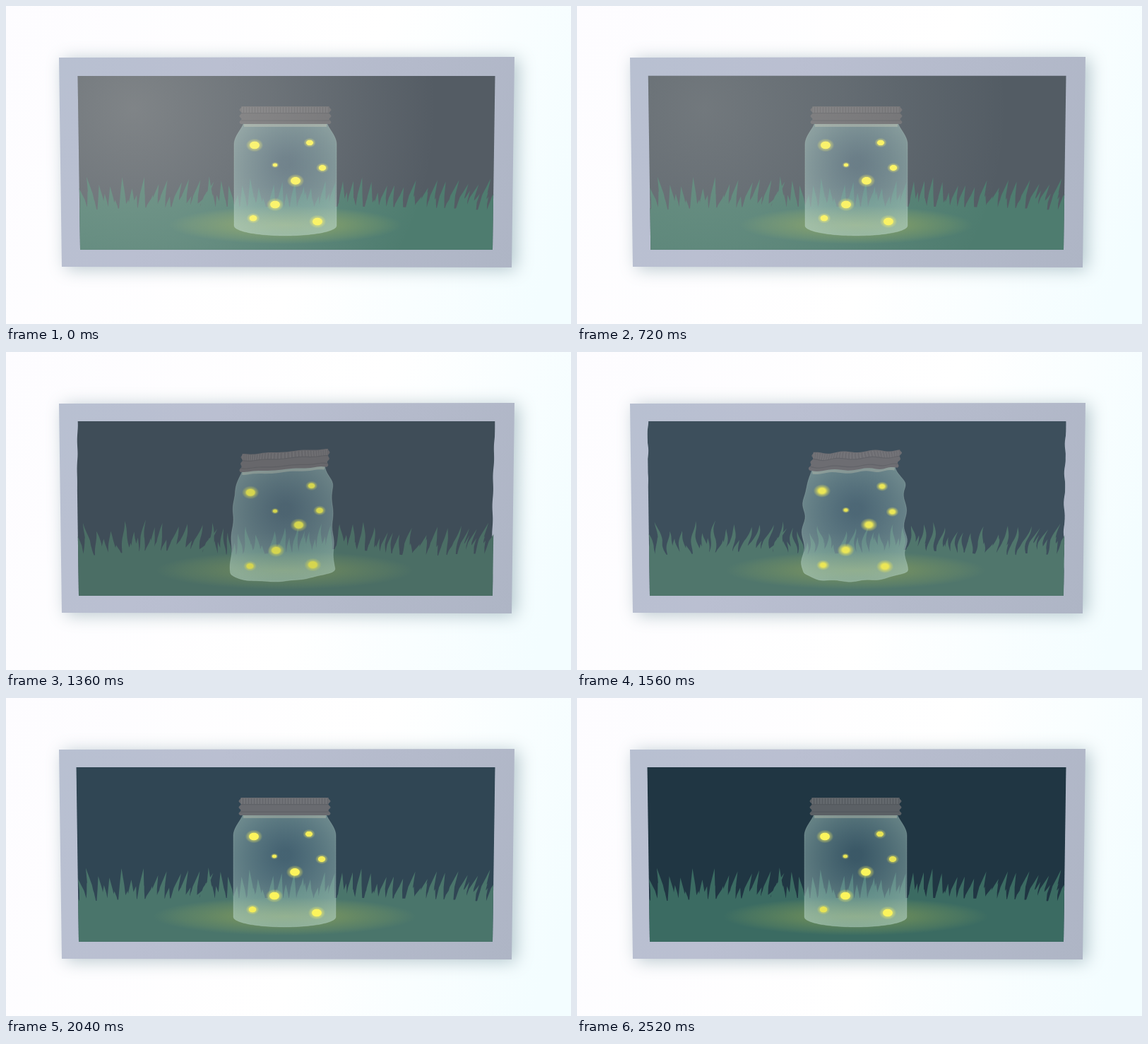
An HTML page with a canvas for the animation above (2.56 s loop, 800 by 450 pixels).

```html
<!DOCTYPE html>
<html>
<head>
<meta charset="utf-8">
<style>
html, body { margin: 0; width: 100%; height: 100%; overflow: hidden; }
canvas { display: block; }
</style>
</head>
<body>
<canvas id="stage" width="800" height="450"></canvas>
<script>
const ctx = document.getElementById('stage').getContext('2d');
const LOOP = 2560, CX = 395.5;
// Glass starts to clear, picture wobbles most, light returns, night
const PHASES = [700, 1360, 1720, 2520];

// x, y, radius
const FLIES = [[352, 197, 7], [430, 193.5, 5], [381, 225, 3.2], [448, 229, 5.2],
  [410, 247.3, 7], [381, 281, 7], [350, 300.3, 5.4], [441, 305, 7]];

const clamp = v => Math.max(0, Math.min(1, v));
const lerp = (a, b, f) => a + (b - a) * f;
const random = n => { const v = Math.sin(n * 127.1) * 43758.5; return v - Math.floor(v); };
const range = (from, to, step) =>
  Array.from({ length: Math.floor((to - from) / step) + 1 }, (_, i) => from + i * step);
const mirror = half => [...half, ...half.slice().reverse().map(([x, y]) => [-x, y])]
  .map(([x, y]) => [CX + x, y]);

const shoulder = y => 59 + 13.5 * Math.sin((y - 166) / 30 * Math.PI / 2) ** 1.3;
const JAR = mirror([
  ...range(166, 196, 3).map(y => [shoulder(y), y]),
  ...range(0, 1, 0.1).map(a => [72.5 * Math.cos(a * Math.PI / 2), 311 + 14 * Math.sin(a * Math.PI / 2)])]);
const LID = mirror(range(142, 167, 1).map(y => [63.5 + 1.5 * Math.cos((y - 147) * 0.72), y]));
const GROUND = [...range(90, 702, 12).map(x => [x, 284 + 6 * ((x - CX) / 296) ** 4]), [702, 355], [90, 355]];

// Two tufts, each fanning out from left to right
const lean = x => x < 285 ? (x - 175) * 0.15 : (x - 360) * 0.04;
const BLADES = [
  ...range(110, 690, 14).map(x => blade(x, lean(x), 250, 9, 6)),
  ...range(102, 694, 8).map(x => blade(x, lean(x) * 0.7, 268, 7, 5))];

function blade(x, tilt, top, spread, width) {
  const base = x + random(x) * 6 - 3;
  const tip = base + tilt + random(x + 0.3) * 6 - 3;
  const y = top + spread * (random(x + 0.7) * 2 - 1);
  const mid = base + (tip - base) * 0.35;
  return [[base - width, 292], [mid - width * 0.55, (290 + y) / 2], [tip, y],
    [mid + width * 0.55, (290 + y) / 2], [base + width, 292]];
}

// Value at time t, given one number per phase.
function phase(t, ...values) {
  const i = t < PHASES[1] ? 0 : t < PHASES[2] ? 1 : 2;
  return lerp(values[i], values[i + 1], clamp((t - PHASES[i]) / (PHASES[i + 1] - PHASES[i])));
}

const tone = (t, ...colours) =>
  `rgb(${[0, 1, 2].map(c => Math.round(phase(t, ...colours.map(v => v[c]))))})`;
const bump = (t, start, peak, end) => clamp(Math.min((t - start) / (peak - start), (end - t) / (end - peak)));

let swell = 0, ripple = 0, shift = 0, drift = 0;

function warp([x, y]) {
  const edge = Math.min(x - 100, 691 - x, y - 98, 345 - y);
  const k = 0.5 + 0.5 * clamp(edge / 35);
  const dx = -swell * Math.cos(0.055 * (x - 357) + 0.012 * (y - 197) + drift)
    + ripple * Math.sin(0.15 * y + 0.05 * x + drift * 3);
  const dy = -0.7 * swell * Math.sin(0.025 * (x - CX))
    + 0.6 * ripple * Math.sin(0.15 * x + 0.08 * y - drift * 3);
  return [x + dx * k + shift, y + dy * k + shift];
}

function addPolygon(points) {
  points.forEach((p, i) => {
    const q = points[(i + 1) % points.length];
    const steps = Math.ceil(Math.hypot(q[0] - p[0], q[1] - p[1]) / 4) || 1;
    for (let s = 0; s < steps; s++) {
      const [x, y] = warp([lerp(p[0], q[0], s / steps), lerp(p[1], q[1], s / steps)]);
      i || s ? ctx.lineTo(x, y) : ctx.moveTo(x, y);
    }
  });
  ctx.closePath();
}

function fill(style, ...polygons) {
  ctx.beginPath();
  polygons.forEach(addPolygon);
  ctx.fillStyle = style;
  ctx.fill();
}

const box = (x, y, w, h) => [[x, y], [x + w, y], [x + w, y + h], [x, y + h]];

function plain(points) {
  ctx.beginPath();
  points.forEach(p => ctx.lineTo(...p));
  ctx.closePath();
}

function shade(gradient, ...stops) {
  stops.forEach(([at, colour]) => gradient.addColorStop(at, colour));
  return gradient;
}

function softEllipse(x, y, rx, ry, ...stops) {
  ctx.save();
  ctx.translate(x, y);
  ctx.scale(rx, ry);
  ctx.fillStyle = shade(ctx.createRadialGradient(0, 0, 0, 0, 0, 1), ...stops);
  ctx.fillRect(-1, -1, 2, 2);
  ctx.restore();
}

function drawFrame() {
  ctx.fillStyle = shade(ctx.createLinearGradient(0, 0, 800, 300),
    [0, '#fdfcff'], [0.6, '#ffffff'], [1, '#f3fdff']);
  ctx.fillRect(0, 0, 800, 450);
  plain([[75, 73], [720, 72], [716, 370], [79, 369]]);
  ctx.save();
  ctx.shadowColor = 'rgba(115,145,155,.5)';
  ctx.shadowBlur = 24;
  ctx.shadowOffsetX = 6;
  ctx.shadowOffsetY = 3;
  ctx.fillStyle = shade(ctx.createLinearGradient(75, 73, 720, 370),
    [0, '#b8c0d1'], [0.3, '#babfd1'], [1, '#aeb5c5']);
  ctx.fill();
  ctx.restore();
}

function drawGlow(t) {
  ctx.globalAlpha = phase(t, 1, 0.65, 0.95, 0.9);
  softEllipse(CX + shift, 310 + shift, phase(t, 165, 182, 185, 188), 27,
    [0, 'rgba(190,195,75,.52)'], [0.45, 'rgba(182,192,80,.32)'],
    [0.8, 'rgba(175,190,85,.14)'], [1, 'rgba(170,190,90,0)']);
  ctx.globalAlpha = 1;
}

function drawJar(t) {
  ctx.globalAlpha = phase(t, 1, 0.82, 0.95, 0.95);
  fill(shade(ctx.createRadialGradient(CX, 222, 8, CX, 232, 105),
    [0, 'rgba(111,155,172,.36)'], [0.45, 'rgba(138,177,180,.48)'], [1, 'rgba(174,205,195,.62)']), JAR);
  ctx.strokeStyle = 'rgba(195,222,212,.25)';
  ctx.stroke();
  fill(shade(ctx.createLinearGradient(0, 255, 0, 325),
    [0, 'rgba(175,205,170,0)'], [1, 'rgba(175,205,170,.15)']), JAR);
  fill('rgba(200,200,180,.4)', box(337, 166, 117, 5));
  ctx.globalAlpha = 1;

  fill(tone(t, [110, 110, 113], [103, 103, 107], [114, 114, 120], [91, 96, 101]), LID);
  fill('rgba(190,190,190,.16)', ...range(334, 457, 4).map(x => box(x, 143, 1, 8)));
  fill('rgba(50,55,60,.18)', ...[151, 161.5].map(y => box(333, y, 125, 1.2)));
}

function drawFlies(t) {
  const blur = clamp(ripple / 2);
  FLIES.forEach(([x, y, r]) => {
    const dim = phase(t, 0, 0.3, 0, r < 5.5 ? 0.16 : 0);
    const colour = [252 - 130 * dim, 244 - 105 * dim, 92 - 45 * dim].map(Math.round);
    const [cx, cy] = warp([x, y]);
    softEllipse(cx, cy, r * 1.75, r * 1.35,
      [lerp(0.52, 0.38, blur), `rgba(${colour})`],
      [lerp(0.6, 0.66, blur), `rgba(${colour},.45)`], [1, `rgba(${colour},0)`]);
  });
}

function draw(t) {
  swell = 5 * bump(t, 1040, 1360, 1800);
  ripple = 2.8 * bump(t, 1200, 1680, 2020);
  shift = phase(t, 0, -1, -1, -1);
  drift = (t - 1360) / 900;

  drawFrame();
  ctx.save();
  const inset = 2 * (1 - clamp((t - 560) / 440));
  plain([[99.5 + inset, 98 + inset / 2], [692.5, 98 + inset / 2], [689, 345], [103 + inset, 345]]);
  ctx.clip();
  fill(tone(t, [84, 92, 100], [63, 77, 88], [59, 80, 95], [32, 54, 67]),
    [[100, 96], [694, 96], [691, 348], [103, 348]]);
  fill(tone(t, [78, 124, 111], [75, 110, 101], [84, 124, 113], [59, 107, 98]), GROUND, ...BLADES);
  drawGlow(t);
  drawJar(t);
  drawFlies(t);

  // Reflection on the glass
  ctx.globalAlpha = 1 - clamp((t - 500) / 740);
  ctx.fillStyle = shade(ctx.createRadialGradient(180, 145, 0, 180, 145, 430),
    [0, 'rgba(245,240,230,.27)'], [0.45, 'rgba(240,238,230,.16)'], [1, 'rgba(235,235,230,0)']);
  ctx.fillRect(98, 96, 600, 252);
  ctx.restore();
}

function tick() {
  draw(performance.now() % LOOP);
  requestAnimationFrame(tick);
}
tick();
</script>
</body>
</html>
```
